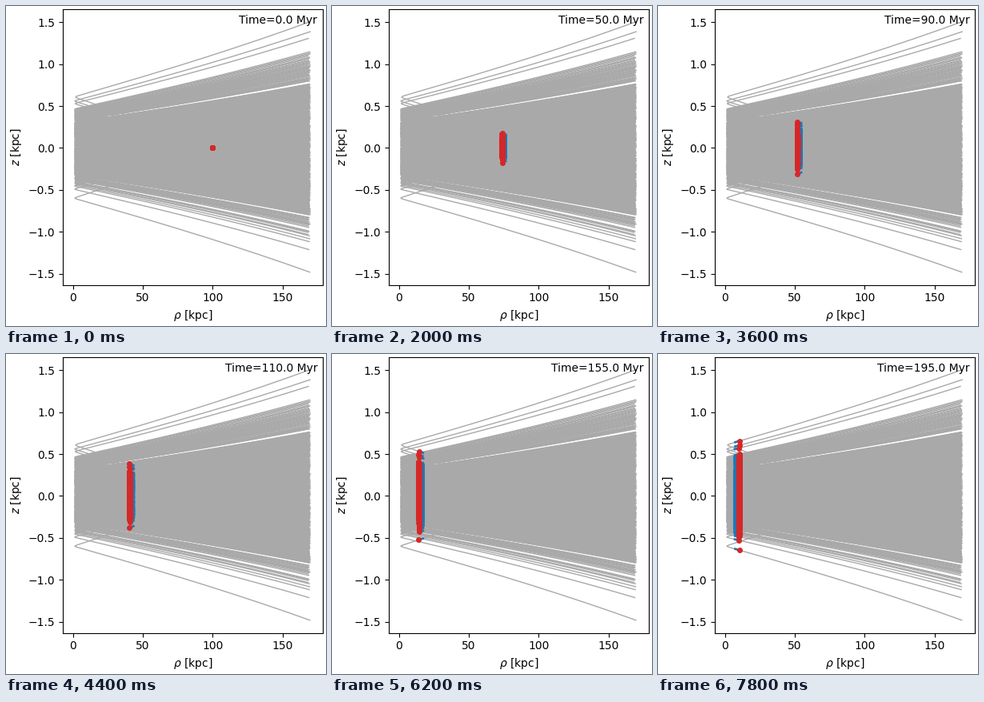
A matplotlib script for the animation above (8000 ms loop, 400 by 400 pixels).

```python
import numpy as np
import matplotlib.pyplot as plt
from matplotlib.animation import FuncAnimation
from matplotlib.collections import LineCollection

FRAMES, INTERVAL = 40, 200
STEP = 5.0                    # Myr per frame
T_PERI, T_END = 178.5, 505.0  # closest approach and end of the orbits
Z_PERI = 0.404                # share of the final height reached at closest approach

rng = np.random.default_rng(4)


def final_heights():
    """Heights of the stars at T_END: a dense core and sparse outer wings."""
    core = np.linspace(-0.80, 0.765, 420)
    upper = np.linspace(0.795, 1.06, 36) + rng.uniform(-0.008, 0.008, 36)
    lower = -np.linspace(0.83, 0.93, 14) + rng.uniform(-0.006, 0.006, 14)
    top = [1.075, 1.085, 1.10, 1.12, 1.135, 1.15, 1.31, 1.39, 1.507]
    bottom = [-0.95, -0.99, -1.0, -1.01, -1.035, -1.05, -1.085, -1.12, -1.215, -1.485]
    return np.concatenate([core, upper, lower, top, bottom])


height = final_heights()
drift = rng.uniform(-0.0016, 0.0016, height.size)
impact = rng.uniform(1.2, 1.9, height.size)


def ease(u):
    """Nearly linear growth that slows a little."""
    return u + 0.05 * u * (1 - u)


def orbit(t):
    """Radius and height of every star at time t."""
    tau = t - T_PERI
    along = 0.61 * tau - 0.00028 * tau * abs(tau) + drift * t
    rho = np.hypot(along, impact)
    if t < T_PERI:
        share = Z_PERI * ease(t / T_PERI)
    else:
        share = Z_PERI + (1 - Z_PERI) * ease(tau / (T_END - T_PERI))
    return rho, height * share


def paths(times):
    """Array of shape (stars, times, 2)."""
    return np.array([orbit(t) for t in times]).transpose(2, 0, 1)


fig, ax = plt.subplots(figsize=(4, 4), dpi=100, layout="constrained")
ax.set(xlim=(-7.28, 178.7), ylim=(-1.634, 1.655),
       xlabel=r"$\rho$ [kpc]", ylabel=r"$z$ [kpc]")

times = np.concatenate([[0, 60, 120, 160, 172], np.arange(175, 182),
                        [184, 196], np.linspace(230, T_END, 8)])
ax.add_collection(LineCollection(paths(times), colors="darkgray", linewidths=1),
                  autolim=False)
trails = LineCollection([], colors="tab:blue", linewidths=2,
                        capstyle="projecting", zorder=3)
ax.add_collection(trails, autolim=False)
stars, = ax.plot([], [], "o", color="tab:red", ms=4, zorder=4)
label = ax.text(0.98, 0.98, "", transform=ax.transAxes, ha="right", va="top")


def update(i):
    t = i * STEP
    trails.set_segments(paths([max(t - STEP, 0), t]))
    stars.set_data(*orbit(t))
    label.set_text(f"Time={t:.1f} Myr")
    return trails, stars, label


anim = FuncAnimation(fig, update, frames=FRAMES, interval=INTERVAL,
                     init_func=lambda: update(0), repeat=True, repeat_delay=0)
plt.show()
```
